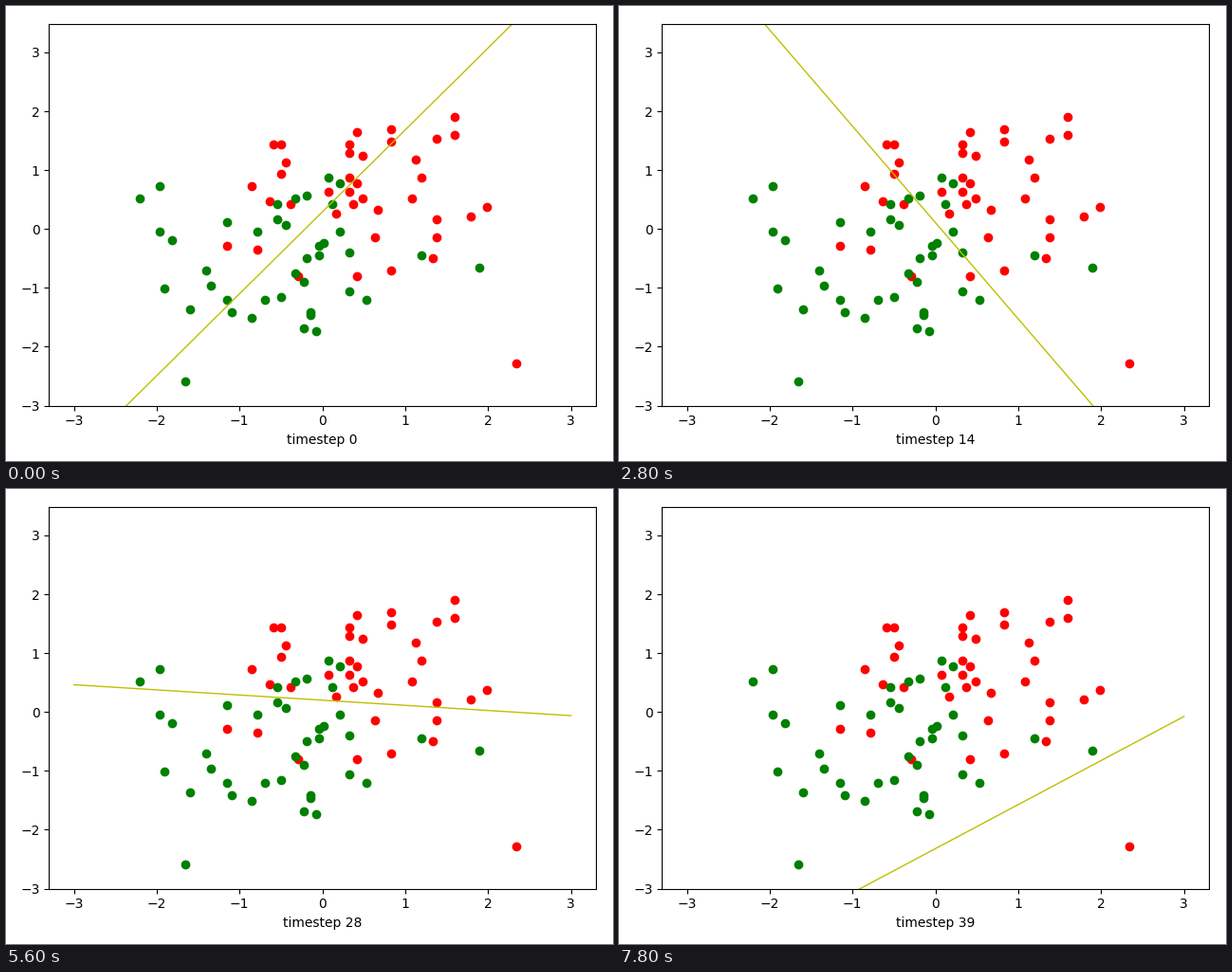
Animation of 640 by 480 pixels, one loop 8000 ms. Source, as a matplotlib script:

```python
import numpy as np
import matplotlib.pyplot as plt
from matplotlib.animation import FuncAnimation

W, H, DPI = 640, 480, 100
STEPS, INTERVAL = 40, 200

RED = np.array([
    (1.59, 1.90), (1.59, 1.60), (0.83, 1.70), (0.83, 1.49), (0.42, 1.65),
    (1.38, 1.53), (0.32, 1.44), (0.32, 1.29), (0.48, 1.24), (1.13, 1.18),
    (1.19, 0.87), (0.32, 0.87), (0.42, 0.78), (0.32, 0.63), (0.07, 0.63),
    (0.48, 0.52), (0.37, 0.42), (1.08, 0.52), (0.67, 0.33), (0.17, 0.26),
    (1.99, 0.37), (1.79, 0.21), (1.38, 0.16), (0.63, -0.14), (1.38, -0.14),
    (1.33, -0.50), (0.83, -0.70), (0.42, -0.80), (-0.29, -0.80),
    (2.34, -2.28), (-0.59, 1.44), (-0.50, 1.44), (-0.44, 1.13),
    (-0.50, 0.94), (-0.85, 0.73), (-0.64, 0.47), (-0.39, 0.42),
    (-1.15, -0.29), (-0.79, -0.35),
])
GREEN = np.array([
    (-2.21, 0.52), (-1.96, 0.73), (-1.96, -0.04), (-1.81, -0.19),
    (-1.91, -1.01), (-1.60, -1.37), (-1.65, -2.59), (-1.40, -0.70),
    (-1.35, -0.96), (-1.15, 0.12), (-1.15, -1.20), (-1.10, -1.41),
    (-0.85, -1.51), (-0.69, -1.20), (-0.50, -1.16), (-0.79, -0.04),
    (-0.54, 0.42), (-0.54, 0.16), (-0.44, 0.07), (-0.33, 0.52),
    (-0.19, 0.57), (0.07, 0.87), (0.21, 0.78), (0.12, 0.42), (0.21, -0.04),
    (0.02, -0.24), (-0.04, -0.29), (-0.04, -0.45), (-0.19, -0.50),
    (0.32, -0.40), (-0.33, -0.75), (-0.23, -0.90), (0.32, -1.06),
    (0.53, -1.20), (-0.14, -1.41), (-0.14, -1.46), (-0.23, -1.68),
    (-0.08, -1.73), (1.19, -0.45), (1.89, -0.66),
])

# Decision boundary: step, angle in degrees, signed distance from the origin
KEYS = np.array([
    (0, 54.3, 0.170), (3, 71.7, 0.118), (6, 90.5, 0.070), (8, 102.5, 0.036),
    (10, 112.6, 0.0054), (12, 116.3, -0.0447), (15, 124.0, -0.063),
    (18, 130.8, -0.0764), (21, 135.0, -0.065), (24, 130.2, -0.0523),
    (28, 175.0, -0.200), (32, 219.07, -0.3766), (35, 230.0, -0.193),
    (37, 217.0, 0.320), (39, 216.8, 1.858),
])


def boundary(step):
    """Slope and intercept of the line at a given step."""
    angle = np.radians(np.interp(step, KEYS[:, 0], KEYS[:, 1]))
    dist = np.interp(step, KEYS[:, 0], KEYS[:, 2])
    return np.tan(angle), dist / np.cos(angle)


fig = plt.figure(figsize=(W / DPI, H / DPI), dpi=DPI)
ax = fig.add_axes([45.3 / W, 58.4 / H, 576.6 / W, 402.5 / H])
ax.set_xlim(-3.3, 3.3)
ax.set_ylim(-3, 3.48)
ax.scatter(*RED.T, color="red")
ax.scatter(*GREEN.T, color="green")
ends = np.array([-3.0, 3.0])
line, = ax.plot(ends, ends, color="y", lw=1)


def update(step):
    slope, intercept = boundary(step)
    line.set_ydata(slope * ends + intercept)
    ax.set_xlabel(f"timestep {step}")
    return line, ax.xaxis.label


anim = FuncAnimation(fig, update, frames=STEPS, interval=INTERVAL,
                     init_func=lambda: update(0), repeat=True, repeat_delay=0)
plt.show()
```
